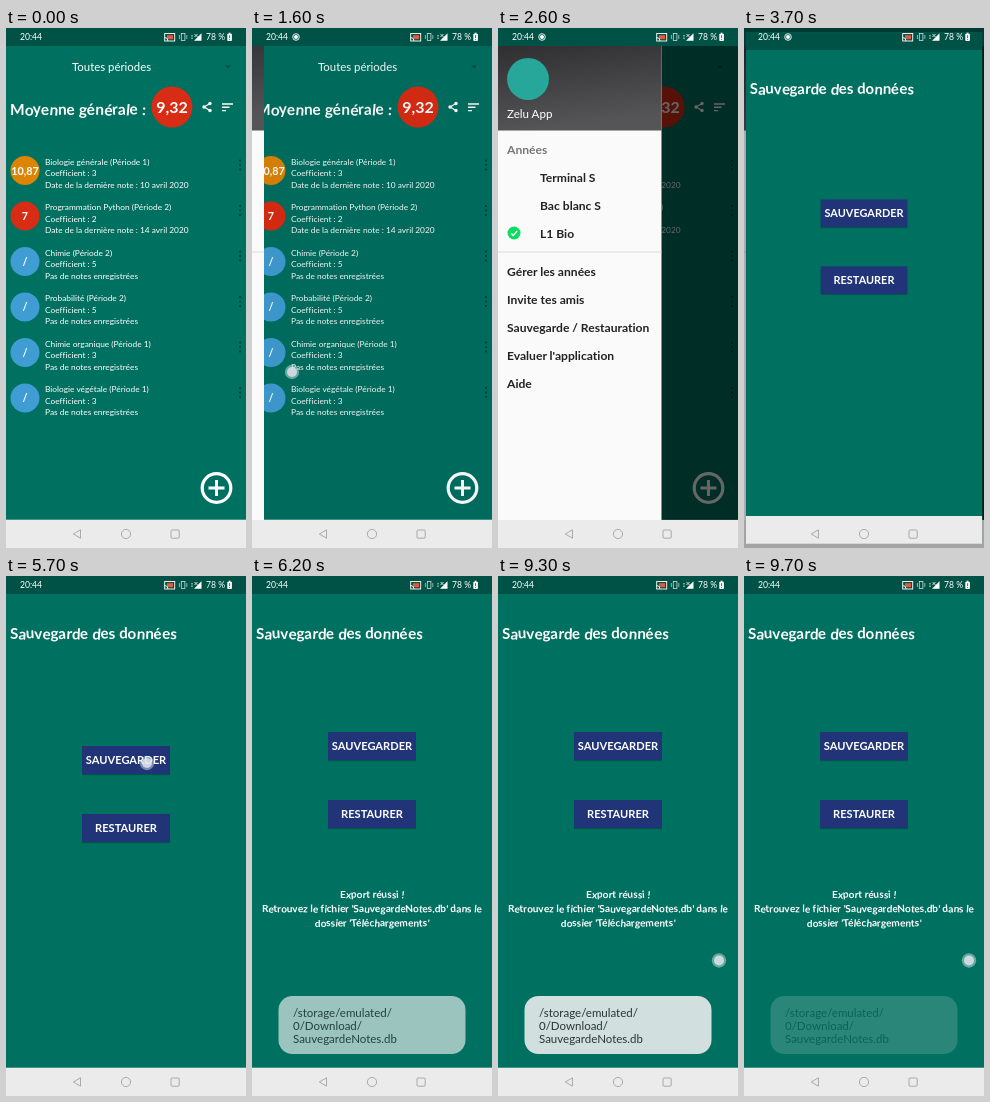
These frames come from a looping animation (240x520 px, 9.8 s). An HTML page:

```html
<!DOCTYPE html>
<html lang="fr">
<head>
<meta charset="utf-8">
<style>
  html, body { margin: 0; width: 100%; height: 100%; overflow: hidden; background: #007060; }
  svg { display: block; width: 100vw; height: 100vh; font-family: Lato, "Open Sans", sans-serif; }
  text { white-space: pre; font-variant-ligatures: none; }
</style>
</head>
<body>
<svg id="stage" viewBox="0 0 240 520"></svg>
<script>
const LOOP = 9800, STEP = 100, DRAWER = 163.5;
const GREEN = '#007060', BAR = '#005247';

const rect = (x, y, w, h, fill, extra = '') =>
  `<rect x="${x}" y="${y}" width="${w}" height="${h}" fill="${fill}" ${extra}/>`;
const circle = (x, y, r, fill, extra = '') =>
  `<circle cx="${x}" cy="${y}" r="${r}" fill="${fill}" ${extra}/>`;
const path = (d, stroke, width, extra = '') =>
  `<path d="${d}" fill="none" stroke="${stroke}" stroke-width="${width}" ${extra}/>`;
const label = (x, y, size, str, fill = '#fff', extra = '') =>
  `<text x="${x}" y="${y}" font-size="${size}" fill="${fill}" ${extra}>${str}</text>`;
const bold = 'font-weight="700"';
const centered = 'text-anchor="middle"';

// Wobbly lettering: each glyph is tilted and nudged off the baseline.
function handwritten(x, y, size, str, extra = '') {
  const wobble = i => Math.sin(i * 2.4) * size / 40;
  const letters = [...str];
  const tilt = letters.map((_, i) => (Math.sin(i * 1.9) * 5).toFixed(1));
  const shift = letters.map((_, i) => (wobble(i) - (i ? wobble(i - 1) : 0)).toFixed(2));
  return label(x, y, size, str, '#fff', `${bold} rotate="${tilt.join(' ')}" dy="${shift.join(' ')}" ${extra}`);
}

const windowBase = rect(0, 0, 240, 520, GREEN) + rect(0, 0, 240, 18, BAR) + rect(0, 491.7, 240, 28.3, '#ebebeb');

const courses = [
  ['10,87', '#dc8505', 'Biologie générale (Période 1)', 3, '10 avril 2020'],
  ['7', '#d92c14', 'Programmation Python (Période 2)', 2, '14 avril 2020'],
  ['/', '#3f9dd3', 'Chimie (Période 2)', 5],
  ['/', '#3f9dd3', 'Probabilité (Période 2)', 5],
  ['/', '#3f9dd3', 'Chimie organique (Période 1)', 3],
  ['/', '#3f9dd3', 'Biologie végétale (Période 1)', 3]
];

function courseRow([grade, color, name, weight, date], i) {
  const y = 142.5 + i * 45.5;
  const info = date ? 'Date de la dernière note : ' + date : 'Pas de notes enregistrées';
  return circle(19, y, 14.5, color) +
    label(19, y + 4, 10.8, grade, '#fff', `${bold} ${centered}`) +
    [name, 'Coefficient : ' + weight, info].map((s, k) => label(39, y - 6 + k * 11.5, 8.35, s)).join('') +
    [-10, -5.5, -1].map(dy => circle(234, y + dy, 0.9, '#00352e')).join('');
}

const homePage = windowBase +
  label(66, 43, 11.4, 'Toutes périodes') +
  '<path d="M219 37.5h6l-3 3z" fill="#004c41"/>' +
  handwritten(4, 87, 15.5, 'Moyenne générale :') +
  circle(166, 79, 20.5, '#d92c14') +
  label(166, 84.5, 16, '9,32', '#fff', `${bold} ${centered}`) +
  path('M204 75.5L198 79L204 82.5', '#fff', 1.2) +
  circle(204, 75.5, 1.7, '#fff') + circle(198, 79, 1.7, '#fff') + circle(204, 82.5, 1.7, '#fff') +
  path('M216 76h11M216 79.3h7.5M216 82.6h4', '#fff', 1.4) +
  courses.map(courseRow).join('') +
  circle(210.5, 460, 14.3, 'none', 'stroke="#fff" stroke-width="3.2"') +
  path('M202.5 460h16M210.5 452v16', '#fff', 3);

const drawerItem = (x, y, str, fill = '#222') => label(x, y, 12.1, str, fill, bold);
const years = ['Terminal S', 'Bac blanc S', 'L1 Bio'];
const actions = ['Gérer les années', 'Invite tes amis', 'Sauvegarde / Restauration', "Evaluer l'application", 'Aide'];

const drawer =
  rect(0, 18, DRAWER, 474, '#fafafa') + rect(0, 18, DRAWER, 84.5, 'url(#slate)') +
  circle(30, 51, 21, '#27a69a') +
  label(9, 90, 11.6, 'Zelu App') +
  drawerItem(9, 125.5, 'Années', '#777') +
  years.map((s, i) => drawerItem(42, 153.5 + i * 28, s)).join('') +
  circle(16, 205, 6.5, '#0bdc62') + path('M13 205.2l2.2 2.2l4-4.3', '#fff', 1.4) +
  rect(0, 223.5, DRAWER, 1, '#dcdcdc') +
  `<g id="rowPress">${rect(0, 286, DRAWER, 28, '#dedede')}</g>` +
  actions.map((s, i) => drawerItem(9, 248 + i * 28, s)).join('');

const button = (y, str) =>
  rect(76, y + 1.2, 88, 28, '#004438', 'opacity=".55"') + rect(76, y, 88, 28, '#203477') +
  label(120, y + 18.3, 11.1, str, '#fff', `${bold} ${centered}`);

const message = ['Export réussi !', "Retrouvez le fichier 'SauvegardeNotes.db' dans le", "dossier 'Téléchargements'"];

const savePage = windowBase +
  handwritten(4, 63, 15.2, 'Sauvegarde des données') +
  `<g id="buttons">${button(170, 'SAUVEGARDER')}${button(238, 'RESTAURER')}</g>` +
  `<g id="message">${message.map((s, i) => handwritten(120, 322 + i * 14.3, 10.1, s, centered)).join('')}</g>`;

const toast = rect(26.5, 420, 187, 58, '#eeefef', 'rx="14" opacity=".88"') +
  ['/storage/emulated/', '0/Download/', 'SauvegardeNotes.db']
    .map((s, i) => label(41, 440.5 + i * 13, 11.5, s, '#2b3331')).join('');

const statusBar =
  label(14, 12.2, 8.6, '20:44') +
  `<g id="recording">${circle(44, 9, 3.3, 'none', 'stroke="#fff" stroke-width=".9"')}${circle(44, 9, 2, '#fff')}</g>` +
  rect(158.7, 5.5, 10, 7.5, 'none', 'stroke="#fff" stroke-width=".9"') +
  rect(161, 7.2, 6, 4, '#f0553c') +
  path('M158.5 9.5a3.5 3.5 0 0 1 3.5 3.5', '#fff', 0.9) +
  rect(175.3, 5.5, 3.6, 7, 'none', 'stroke="#fff" stroke-width=".8" opacity=".8"') +
  path('M173.4 7v4M180.8 7v4', '#fff', 0.7, 'opacity=".8"') +
  path('M186 7v4', '#fff', 0.9, 'stroke-dasharray="1.5 1"') +
  '<path d="M188 12.7h7.5v-7.5z" fill="#fff"/>' + path('M188.5 6l3 3m0-3l-3 3', '#fff', 0.8) +
  label(200, 12.2, 8.6, '78 %') +
  rect(221.3, 5.8, 4.6, 7.2, '#fff', 'rx=".7"') + rect(222.7, 4.7, 1.8, 1.2, '#fff') +
  path('M223.6 7.2v2.8m0 .9v1', BAR, 0.8);

const navBar =
  path('M67.3 506l7.2-4.2v8.4z', '#a3a3a3', 0.9) +
  circle(120, 506, 4.6, 'none', 'stroke="#a3a3a3" stroke-width=".9"') +
  rect(165, 502, 8.2, 8.2, 'none', 'rx="1" stroke="#a3a3a3" stroke-width=".9"');

document.getElementById('stage').innerHTML = `
  <defs><linearGradient id="slate" x2=".25" y2="1">
    <stop offset="0" stop-color="#2f2f32"/><stop offset="1" stop-color="#555558"/>
  </linearGradient></defs>
  <g>${homePage}</g>
  <g id="scrim">${rect(0, 18, 240, 474, '#000')}</g>
  <g id="drawer">${drawer}</g>
  <g id="dim">${rect(0, 0, 240, 520, '#000')}</g>
  <g id="save">${savePage}</g>
  <g id="toast">${toast}</g>
  ${statusBar}${navBar}
  <g id="touch">${circle(0, 0, 7.2, '#cfdfe6', 'opacity=".5"')}${circle(0, 0, 5, '#e3e6ee', 'opacity=".8"')}</g>`;

const clamp = v => Math.min(1, Math.max(0, v));
const progress = (t, from, to) => clamp((t - from) / (to - from));
const within = (t, from, to) => t >= from && t < to;
const el = id => document.getElementById(id);
const fade = (id, opacity) => el(id).setAttribute('opacity', +opacity);
const place = (id, transform) => el(id).setAttribute('transform', transform);

// Piecewise linear track of [time, value] points.
function track(t, points) {
  let [t0, v0] = points[0];
  for (const [t1, v1] of points) {
    if (t < t1) return v0 + (v1 - v0) * progress(t, t0, t1);
    [t0, v0] = [t1, v1];
  }
  return v0;
}

function touchPoint(t) {
  if (within(t, 1550, 2050)) return [track(t, [[1550, 20], [1600, 40], [2000, 185]]), 344];
  if (within(t, 3400, 3500)) return [100, 300];
  if (within(t, 5600, 5850)) return [141, 187];
  if (t >= 8800) return [track(t, [[9200, 219], [9500, 225]]), 384.5];
  return null;
}

function render(t) {
  const open = track(t, [[1500, 0], [1600, 12], [1700, 50], [1900, 130], [2000, 151], [2200, DRAWER]]);
  place('drawer', `translate(${open - DRAWER} 0)`);
  fade('scrim', 0.6 * open / DRAWER);
  fade('rowPress', within(t, 3400, 3600));

  const scale = 1 - 0.1 * (1 - progress(t, 3500, 3937)) ** 3;
  place('save', `translate(120 260) scale(${scale}) translate(-120 -260)`);
  fade('save', progress(t, 3500, 3650));
  fade('dim', 0.3 * progress(t, 3500, 3700));

  const exported = t >= 5900;
  place('buttons', `translate(0 ${exported ? -14 : 0})`);
  fade('message', exported);
  fade('toast', progress(t, 5900, 6300) * (1 - progress(t, 9300, 9800)));

  fade('recording', within(t, 300, 5200));
  const touch = touchPoint(t);
  fade('touch', touch !== null);
  if (touch) place('touch', `translate(${touch.join(' ')})`);
}

const start = performance.now();
function tick() {
  const t = (performance.now() - start) % LOOP;
  render(Math.floor(t / STEP) * STEP);
  requestAnimationFrame(tick);
}
tick();
</script>
</body>
</html>
```
